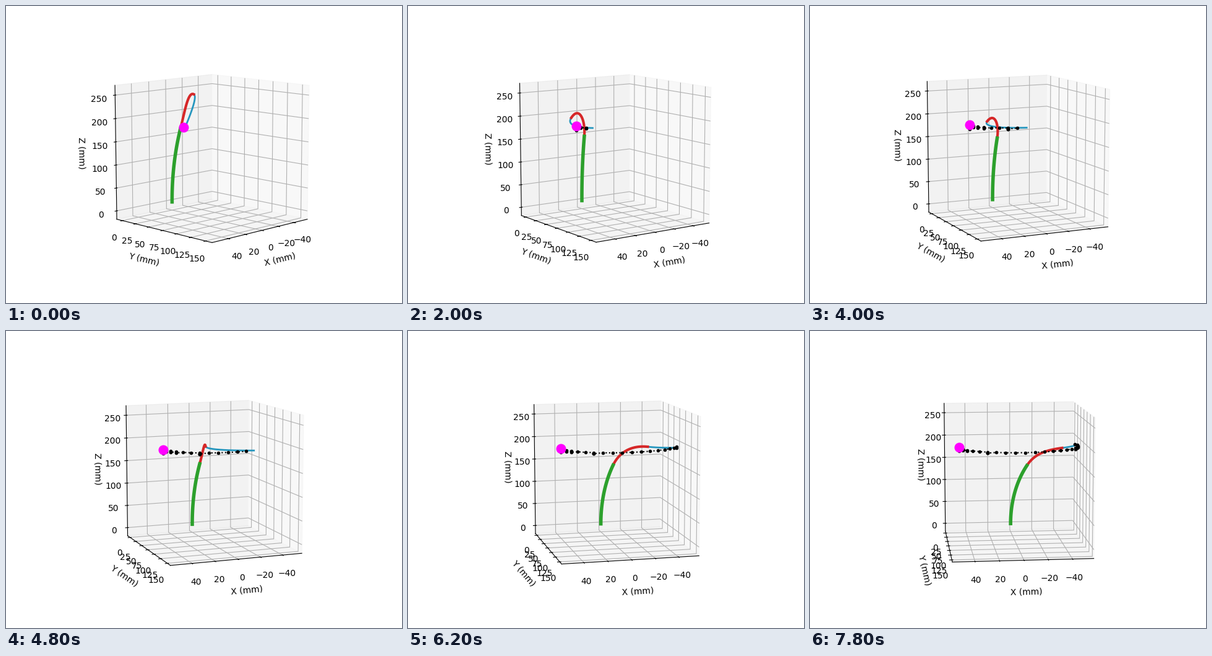
A matplotlib script that plays this animation: 640 by 480 pixels, repeating every 8000 ms.

```python
import numpy as np
import matplotlib.pyplot as plt
from matplotlib.animation import FuncAnimation

FRAMES = 40
CENTER, RADIUS, HEIGHT = 100, 50, 200
GREEN, RED, BLUE = "#2ca02c", "#d62728", "#2596be"
UP = np.array([0.0, 0.0, 1.0])


def tip_path():
    """Tip positions on the circle: the arm waits, moves, rests and slows."""
    i = np.arange(FRAMES)
    step = np.floor(np.interp(i, [0, 4, 10, 14, 18, 29, 39],
                              [0, 0, 3, 6, 6, 17, 21.5]))
    angle = step * 2 * np.pi / 39
    repeat = np.diff(step, prepend=-1) == 0
    drop = 8 * np.exp(-i / 2) + 2 * repeat
    return np.column_stack([RADIUS * np.cos(angle),
                            CENTER + RADIUS * np.sin(angle),
                            HEIGHT - drop])


def hermite(p, q, tp, tq, n=40):
    t = np.linspace(0, 1, n)[:, None]
    return ((2 * t**3 - 3 * t**2 + 1) * p + (t**3 - 2 * t**2 + t) * tp
            + (3 * t**2 - 2 * t**3) * q + (t**3 - t**2) * tq)


def bezier(p, c, q, n=40):
    t = np.linspace(0, 1, n)[:, None]
    return (1 - t)**2 * p + 2 * t * (1 - t) * c + t**2 * q


def arc_end(chord, start):
    """Unit tangent at the end of a circular arc over the chord."""
    d = chord / np.linalg.norm(chord)
    return 2 * (d @ start) * d - start


def joints(i):
    """Ends of the green and red tubes: home pose fading into a half turn."""
    s = np.clip((i - 8.5) / 33, 0, 1)
    turn = np.cos(np.pi * s * s * (3 - 2 * s))
    home = np.exp(-i / 7)
    green = np.array([5 - 0.011 * i**2,
                      25 - 13 * turn + 13 * home,
                      142 + 31 * home])
    red = np.array([38 * turn - 26 * np.exp(-i / 3),
                    73.5 - 13.5 * turn,
                    192 + 60 * home])
    return green, red


def tubes(i):
    a, b = joints(i)
    reach, span = np.linalg.norm(a), np.linalg.norm(b - a)
    ta = arc_end(a, UP)
    droop = 1 - (i / FRAMES)**2
    tb = span * (arc_end(b - a, ta) - droop * UP)
    return (bezier(b, b + tb / 4, tip[i]),
            hermite(a, b, 1.4 * span * ta, tb),
            hermite(0 * a, a, reach * UP, reach * ta))


tip = tip_path()
fig = plt.figure(figsize=(6.4, 4.8), dpi=100)
ax = fig.add_subplot(projection="3d")
ax.set_box_aspect((1, 1, 1))
ax.set(xlim=(-57.6, 58.4), ylim=(-10.9, 160.9), zlim=(-18.4, 270.9),
       xlabel="X (mm)", ylabel="Y (mm)", zlabel="Z (mm)")

lines = [ax.plot([], [], [], color=c, lw=w)[0]
         for c, w in ((BLUE, 2), (RED, 3), (GREEN, 4))]
trace, = ax.plot([], [], [], "k:o", ms=3, lw=1.5)
ax.plot([RADIUS], [CENTER], [HEIGHT], "o", color="magenta", ms=10.5)


def update(i):
    ax.view_init(elev=10, azim=45 + i)
    for line, pts in zip(lines, tubes(i)):
        line.set_data_3d(*pts.T)
    trace.set_data_3d(*tip[:i].T)
    return [*lines, trace]


anim = FuncAnimation(fig, update, frames=FRAMES, interval=200,
                     repeat=True, repeat_delay=0)
plt.show()
```
